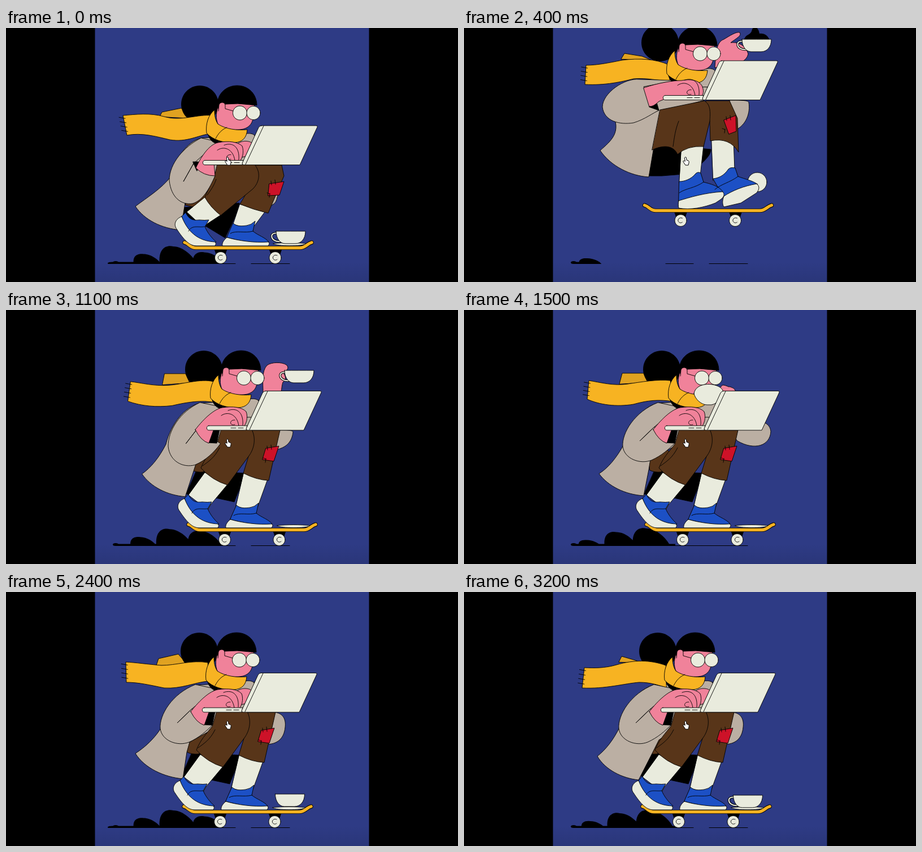
Animation of 800x450 px, one loop 3300 ms. Source, as an HTML page with a canvas:

```html
<!DOCTYPE html>
<html lang="en">
<head>
<meta charset="utf-8">
<title>Skating typist</title>
<style>
html, body { margin: 0; width: 100%; height: 100%; overflow: hidden; background: #000; }
canvas { display: block; }
</style>
</head>
<body>
<canvas id="stage" width="800" height="450"></canvas>
<script>
const ctx = document.getElementById('stage').getContext('2d');
const LOOP = 3300, STEP = 100, NUM = /-?\d+(\.\d+)?/g;
const CREAM = '#e9ebdd', SKIN = '#f0829a', YELLOW = '#f7b322', COAT = '#bbafa3',
  BROWN = '#583519', BLUE = '#1c50c5', RED = '#cd1228', BLACK = '#000';
let t = 0;

// Paths use absolute commands only, so their numbers alternate x, y.
const shift = (path, dx, dy = 0) => {
  let i = 0;
  return path.replace(NUM, n => (+n + (i++ % 2 ? dy : dx)).toFixed(1));
};
const mix = (a, b, k) => {
  const to = b.match(NUM);
  let i = 0;
  return a.replace(NUM, n => (+n + (to[i++] - n) * k).toFixed(2));
};
const circle = (x, y, r) => {
  const c = r * .552;
  return shift(`M${r} 0 C${r} ${c} ${c} ${r} 0 ${r} C${-c} ${r} ${-r} ${c} ${-r} 0 ` +
    `C${-r} ${-c} ${-c} ${-r} 0 ${-r} C${c} ${-r} ${r} ${-c} ${r} 0Z`, x, y);
};

// Standing, crouching and jumping shapes; the last two may be plain offsets.
function pose(stand, crouch, jump, extra) {
  const shape = p => typeof p === 'string' ? p : shift(stand, ...p);
  return { 0: shape(crouch), 400: shape(jump), 600: shift(stand, 7), 1500: shift(stand, 7),
    2000: shift(stand, 3), 2400: shift(stand, -1), 3200: stand, ...extra };
}
function at(keys) {
  const times = Object.keys(keys).map(Number);
  let i = times.length - 1;
  while (times[i] > t) i--;
  const from = times[i], to = times[i + 1] ?? LOOP;
  const k = (t - from) / (to - from);
  return mix(keys[from], keys[times[i + 1] ?? 0], from === 400 ? k * k : k * k * (3 - 2 * k));
}
function paint(path, fill, line = .9, color = BLACK) {
  const p = new Path2D(path);
  if (fill) { ctx.fillStyle = fill; ctx.fill(p); }
  if (line) { ctx.lineWidth = line; ctx.strokeStyle = color; ctx.stroke(p); }
}
const draw = (keys, fill, line, color) => paint(at(keys), fill, line, color);
const number = keys => +at(Object.fromEntries(Object.entries(keys).map(([k, v]) => [k, String(v)])));

const HEAD = [[0, 30], [4, -75]], LAP = [[0, 29.5], [4, -85.5]], BOARD = [[0, 0], [3.5, -66]];

const legs = [
  [CREAM, pose(circle(440, 375, 4), [0, 0], circle(519, 273, 17))],
  // far leg
  [CREAM, pose('M414 288 L456 300 L438 350 L420 353 L400 348Z', 'M414 312 L458 326 L440 350 L420 353 L402 348Z',
    'M438 196 L477 196 L479 252 L460 268 L441 270Z')],
  [BLUE, pose('M401 346 C408 352 416 351 425 350 Q433 349 440 342 L436 360 C446 368 458 371 464 379 L460 381 C440 381 410 377 390 371Z',
    [1, 0], 'M441 267 C450 266 460 262 468 250 Q472 246 480 248 L485 263 C498 268 510 270 520 277 L517 279 C495 280 475 288 460 300Z')],
  [CREAM, pose('M390 371 C384 376 381 381 382 386 L420 386 L463 386 Q467 381 463 379 C440 381 410 377 390 371Z',
    [1, 0], 'M460 298 C457 305 457 313 460 317 L490 310 L518 292 Q526 282 518 276 C495 280 475 288 460 298Z')],
  [BROWN, pose('M420 213 L470 213 L478 213 L458 302 Q436 301 413 289 L425 250Z',
    'M432 243 L488 243 L492 262 L464 328 Q438 322 414 312 L430 285Z',
    'M428 129 L470 129 L484 160 L486 220 Q470 193 436 200 L435 165Z')],
  [RED, pose('M453 245 L476 241 L467 268 L447 265Z', 'M466 276 L492 272 L484 296 L464 297Z',
    'M460 163 L481 155 L482 183 L469 188Z')],
  [null, pose('M455 241 L456 248 M462 239 L463 247 M448 262 L453 264 M452 270 L453 263', [14, 30], [9, -84])],
  // near leg
  [CREAM, pose('M345 288 L386 308 L355 345 L350 354 L316 328Z', 'M352 300 L382 330 L356 347 L350 354 L320 326Z',
    'M385 210 L424 208 L418 262 L400 275 L381 275Z')],
  [BLUE, pose('M316 327 C322 340 330 341 340 340 Q350 341 357 340 L350 352 C354 362 362 372 370 379 L368 381 C345 380 322 372 309 334Z',
    [2, 0], 'M381 272 C390 272 402 268 410 258 Q414 254 419 257 L424 273 C436 276 452 280 458 290 L456 293 C425 292 400 302 380 308Z')],
  [CREAM, pose('M309 334 C298 338 294 348 300 356 C312 374 322 386 335 386 L368 386 Q371 382 368 379 C345 378 322 368 309 334Z',
    [2, 0], 'M380 306 C379 310 379 316 380 319 C400 323 425 318 445 310 L454 304 Q464 297 458 290 C425 292 400 300 380 306Z')],
  [null, pose('M322 360 C328 348 340 354 350 352 M396 364 C406 358 422 364 436 360', [1, 0],
    'M381 292 C392 284 408 284 424 273 M444 286 C456 276 470 274 485 263')],
  [BROWN, pose('M374 212 L428 212 C436 228 432 245 424 257 L385 310 Q358 302 338 280 C345 262 355 252 366 238Z',
    'M374 242 L440 242 C452 256 448 274 437 285 L380 332 Q362 318 352 300 C358 285 364 275 370 258Z',
    'M347 145 L425 129 C437 135 436 150 435 165 L424 210 Q395 208 378 224 C370 206 350 208 333 216Z')],
  [null, pose('M341 276 C352 268 362 262 371 244', 'M356 296 C362 288 368 280 372 268', 'M370 210 C372 195 374 180 380 165')]
];
const lining = pose('M330 285 L413 289 C412 305 402 327 397 340 L360 332 L312 326Z',
  'M314 318 L413 310 C410 330 395 355 388 372 L355 352 L316 340Z',
  'M333 205 L437 215 C437 228 420 240 400 258 L350 262 L327 262Z');
const seat = pose('M320 266 L350 245 L366 260 L342 287 Q330 288 322 284Z', 'M318 310 L345 290 L360 290 L352 310 L335 318 L318 314Z',
  'M345 150 L360 150 L372 180 L370 210 L350 210 L335 215Z');
const coat = pose('M335 165 C310 172 285 200 276 238 C265 262 250 280 236 291 C250 315 280 330 309 333 L333 286 L345 262 L420 213 L440 160Z',
  'M345 195 C320 202 300 230 292 263 C275 285 250 300 229 316 C245 340 275 355 309 358 L317 310 L330 300 L420 242 L440 190Z',
  'M335 90 C310 92 270 110 262 150 C280 185 260 200 241 217 C260 245 295 262 327 264 L337 205 L347 150 L425 128 L435 90Z',
  { 1500: 'M342 165 C317 172 292 200 283 238 C270 262 255 280 239 290 C255 312 285 327 318 329 L327 283 L330 264 L427 213 L447 160Z',
    2400: 'M335 165 C310 172 285 200 276 238 C265 258 245 276 229 286 C245 312 280 328 313 331 L320 284 L325 266 L420 213 L440 160Z' });
const farShoulder = pose('M400 165 C420 156 440 154 441 164 L430 190 L400 190Z', ...LAP);
const sleeve = pose('M336 164 C295 180 272 218 274 242 C277 264 305 274 325 266 C343 258 356 246 366 236 L330 207 L304 232 L330 207 L372 172Z',
  'M345 195 C315 210 289 240 289 270 C292 300 310 314 330 311 C348 306 360 285 370 262 L332 240 L314 272 L332 240 L375 202Z',
  'M310 91 C285 88 245 115 245 140 C248 165 275 172 300 168 C320 162 335 150 345 146 L318 104 L324 110 L318 104 L375 93Z',
  { 800: 'M343 164 C312 180 291 212 291 242 C294 272 315 284 336 280 C356 272 372 256 384 237 L340 212 L323 240 L340 212 L382 172Z' });
const sleeveHole = pose('M350 235 L366 236 L371 212 L358 212Z', 'M331 237 L340 237 L346 242 L338 253Z', 'M328 140 L345 146 L341 132 L336 130Z');
const forearm = pose('M328 212 C345 190 362 176 375 173 C395 170 410 172 418 180 C422 190 418 205 412 207 L362 208 L352 236 Q338 232 328 212Z',
  'M336 248 C348 222 362 206 375 203 C395 199 410 202 418 209 C422 220 418 234 412 237 L368 238 L370 262 Q350 262 336 248Z',
  'M318 106 C345 97 370 93 385 93 C400 90 415 92 421 102 C425 110 424 118 420 121 L365 122 L345 130 Q335 140 328 139Z');
const fingers = pose('M374 187 C385 179 402 184 405 205 M386 178 C402 172 414 182 412 204 M398 203 C388 206 388 194 398 195', ...LAP);
const typing = pose('M404 180 C415 168 430 170 435 174 L424 198 L416 200 C422 186 410 180 404 184Z', ...LAP);
const cuff = {
  0: 'M470 243 C486 250 484 290 480 300 C478 310 474 313 465 316Z',
  400: 'M470 128 C490 128 504 128 504 132 C507 150 500 172 480 181Z',
  600: 'M470 213 C490 213 508 212 508 216 C506 235 495 246 470 249Z',
  1100: 'M470 213 C490 213 508 212 508 216 C506 235 495 246 470 249Z',
  1500: 'M470 213 C505 190 541 192 543 215 C542 240 515 250 484 232Z',
  2000: 'M470 225 C480 235 490 270 495 306 C490 315 475 320 455 322Z',
  2400: 'M470 213 C490 212 496 225 494 240 C492 260 480 270 460 270Z',
  3200: 'M470 213 C490 212 496 225 494 240 C492 260 480 270 460 270Z'
};
const raised = 'M444 70 C446 45 446 25 460 20 C470 14 482 6 488 8 C492 14 482 18 472 26 C490 24 500 35 503 46 C500 60 485 62 478 66Z';
const holding = 'M455 146 C455 130 452 108 462 98 C470 92 488 92 496 97 C502 102 498 108 490 110 C496 118 496 124 490 128 C488 134 488 140 487 146Z';
const farArm = { 0: shift(raised, -10, 140), 400: raised, 600: holding, 1100: holding,
  1500: 'M452 148 C452 140 454 135 458 133 C462 133 466 135 468 136 C470 136 472 136 473 137 C478 138 480 142 480 143 C480 145 480 147 480 148Z' };
const fist = 'M462 320 L495 311 C499 330 505 340 525 343 C540 350 541 368 528 374 L480 372 C468 350 465 335 462 320Z';
const reach = { 0: fist, 1700: shift(fist, 20, -150), 1800: shift(fist, 20, -100), 2000: fist, 2300: shift(fist, -30, -110) };

// The cup rides the board, is lifted, drunk from and put back.
function cupPath(path, mouth) {
  const go = (x, y) => shift(path, x, y);
  return { 0: path, 200: go(10, -215), 400: go(14, -340), 600: go(15, -253), 1100: go(15, -253),
    1300: mouth, 1600: mouth, 1800: go(20, -100), 2000: go(.5, 0), 2400: go(-1.5, -2), 3200: go(-1.5, 0) };
}
const cup = cupPath('M478 360 C478 374 486 382 494 382 L512 382 C522 382 530 374 530 360 C512 360 495 360 478 360Z',
  'M407 148 C409 158 420 168 430 168 L438 168 C450 166 459 152 458 142 C450 128 410 126 407 148Z');
const ear = 'M481 364 C465 360 467 380 486 378';
const handle = cupPath(ear, shift(ear, -60, -220));
const splash = {
  0: 'M480 361 C488 361 490 361 500 361 C510 361 515 361 518 361 C522 361 524 361 528 361Z',
  400: 'M496 20 C500 9 508 14 510 2 C514 -4 521 -2 523 10 C532 9 538 14 540 20Z',
  800: 'M502 107 C498 98 504 93 510 94 C520 95 522 98 526 101 C530 104 529 106 528 107Z',
  1100: 'M502 107 C502 107 504 107 510 107 C520 107 522 107 526 107 C530 107 529 107 528 107Z'
};

const flag = 'M368 128 C345 120 310 135 285 135 C260 135 240 130 220 128 L214 164 C240 172 265 173 290 171 C320 165 345 160 370 165Z';
const ripple = 'M357 128 C335 122 305 131 282 136 C255 138 235 130 217 128 L211 164 C235 170 260 172 285 168 C315 160 340 158 362 164Z';
const scarf = {
  0: 'M365 155 C340 152 310 166 280 157 C255 150 230 153 207 155 L214 190 C240 185 265 192 290 198 C320 203 340 190 362 187Z',
  400: 'M362 65 C340 55 310 53 280 57 C255 62 235 66 216 66 L214 100 C250 102 280 95 300 90 C325 88 340 93 364 94Z',
  600: shift(flag, 0, -4), 800: flag,
  1500: 'M365 125 C345 122 310 128 290 131 C265 135 240 128 221 125 L218 158 C240 168 270 172 300 167 C325 160 345 158 370 162Z',
  2000: ripple,
  2400: 'M357 125 C330 120 300 130 275 130 C250 128 230 125 212 124 L213 160 C235 160 255 165 280 170 C310 172 335 160 357 158Z',
  2800: shift(ripple, -3),
  3200: 'M357 130 C330 120 300 120 270 129 C250 135 230 135 213 134 L209 170 C250 172 285 162 310 160 C330 160 345 165 358 170Z'
};
const backTail = {
  0: 'M272 157 L276 149 L310 142 L328 160Z', 400: 'M278 55 L284 45 L315 50 L330 56Z',
  600: 'M279 134 L281 114 L318 114 L325 130Z', 1500: 'M275 131 L280 112 L318 112 L325 128Z',
  2000: 'M274 131 L275 112 L312 112 L320 128Z', 2400: 'M266 130 L270 118 L305 110 L322 130Z',
  3200: 'M274 124 L279 114 L300 120 L318 126Z'
};
const bun = pose(circle(343, 105, 33), [0, 30], [4, -79]);
const head = [
  [SKIN, pose('M377 104 C372 118 370 130 376 142 C390 152 410 151 420 149 C432 146 438 136 437 126 L440 104Z', ...HEAD)],
  [BLACK, pose('M374 106 C374 86 390 72 409 72 C430 72 444 88 444 107 L410 104 L388 105 L378 118Z', ...HEAD)],
  [SKIN, pose('M377 106 C379 100 388 101 388 107 L389 118 C386 124 378 124 376 117Z', ...HEAD), 0],
  [null, pose('M376 117 L377 106 C379 100 388 101 388 107 L388 113 L402 117', ...HEAD)],
  [CREAM, pose(circle(414, 120.5, 12.5), ...HEAD)],
  [CREAM, pose(circle(438, 120.5, 12), ...HEAD)]
];
const collarShade = pose('M356 150 C358 172 372 180 392 174 L380 160Z', ...HEAD);
const collar = pose('M369 115 C358 124 353 140 355 156 C365 168 385 174 405 173 C418 172 426 165 427 150 C410 152 388 149 375 140 C370 132 369 124 369 115Z', ...HEAD);
const collarFold = pose('M371 166 C376 156 382 150 391 146', ...HEAD);

const base = pose('M352 205 L420 205 L418 213 L352 213 C347 213 347 205 352 205Z', ...LAP);
const screen = pose('M452 143.5 L549 143.5 Q552 143.5 551 146 L520 213 L420 213 Q417 212 419 208 L447 147 Q449 143.5 452 143.5Z', ...LAP);
const edges = pose('M456 144 L424 212 M391 209 L400 209 M404 209 L413 209', ...LAP);

const deck = pose('M316 380 C324 382 326 389.5 336 389.5 L520 389.5 C530 389.5 533 382 541 380', ...BOARD);
const trucks = pose('M369 393 L391 393 L388 402 L372 402Z M466 393 L488 393 L485 402 L469 402Z', ...BOARD);
const wheels = pose(circle(380, 407, 10.5) + circle(476.5, 407, 10.5), ...BOARD);
const hubs = pose('M383 403 C377 400 373 407 377 410 C379 412 382 411 383 410 M480 403 C474 400 470 407 474 410 C476 412 479 411 480 410', ...BOARD);
const saucer = pose('M473 382 C478 387 526 387 531 382 C515 380 489 380 473 382Z', ...BOARD);

// Dust lumps swell behind the wheel and thin out to the left.
const drift = { 0: 0, 400: -80, 800: -120, 1500: -243, 2000: -304, 2400: -378, 3200: -507, 3299: -540 };
const reachRight = { 0: 380, 100: 370, 400: 246, 600: 215, 700: 380, 3200: 380 };
function dust() {
  const GAP = 54, limit = number(reachRight);
  const phase = ((t < 3200 ? number(drift) : -507) % GAP + GAP) % GAP;
  ctx.fillStyle = BLACK;
  for (let x = 140 + phase; x < 380; x += GAP) {
    const size = Math.max(0, Math.min((x - 185) / 115, 1, (390 - x) / 48));
    const cut = Math.max(0, Math.min(1, (limit - x) / 26));
    const h = 30 * size * cut, w = 12 + 18 * size;
    if (h < 1) continue;
    ctx.fill(new Path2D(`M${x - w} 418 C${x - w - 3} ${417 - h * .9} ${x - w * .6} ${417 - h * 1.1} ${x - w * .2} ${417 - h}` +
      ` C${x + w * .4} ${417 - h} ${x + w} ${417 - h * .4} ${x + w * 1.2} 418Z`));
  }
  ctx.fillRect(194, 414.5, Math.max(0, limit - 200), 3.5);
  ctx.beginPath();
  ctx.ellipse(194, 415.5, 5, 2.5, 0, 0, 7);
  ctx.fill();
  paint(`M357 417.5 L${t >= 1300 && t < 2200 ? 436 : 406} 417.5 M434 417.5 L502 417.5`, null, 1);
}

function drawScarf() {
  draw(backTail, '#e0a221');
  draw(bun, BLACK, 0);
  const path = at(scarf), n = path.match(NUM).map(Number);
  paint(path, YELLOW);
  for (let i = 0; i < 4; i++) {
    const k = .15 + i * .22, x = n[12] + (n[14] - n[12]) * k + 3, y = n[13] + (n[15] - n[13]) * k;
    paint(`M${x} ${y} L${x - 11} ${y - 2}`);
  }
}

function render() {
  ctx.fillStyle = BLACK;
  ctx.fillRect(0, 0, 800, 450);
  ctx.save();
  ctx.beginPath();
  ctx.rect(157.5, 0, 485, 450);
  ctx.clip();
  const sky = ctx.createLinearGradient(0, 415, 0, 450);
  sky.addColorStop(0, '#2e3b85');
  sky.addColorStop(1, '#2a3679');
  ctx.fillStyle = sky;
  ctx.fillRect(157, 0, 486, 450);
  ctx.lineCap = ctx.lineJoin = 'round';

  dust();
  draw(trucks, BLACK, 0);
  draw(wheels, CREAM);
  draw(hubs, null);
  draw(deck, null, 7.2);
  draw(deck, null, 5.4, YELLOW);
  if (t < 200 || t > 500) draw(saucer, CREAM);

  draw(lining, BLACK);
  if (t >= 1700 && t < 2300) draw(reach, SKIN);
  draw(cuff, COAT);
  draw(seat, BROWN);
  draw(coat, COAT);
  draw(farShoulder, COAT);
  legs.forEach(([fill, keys]) => draw(keys, fill));
  drawScarf();
  draw(sleeve, COAT);
  draw(sleeveHole, BLACK);
  draw(collarShade, BLACK);
  if (t >= 100 && t < 1700) draw(farArm, SKIN);
  head.forEach(([fill, keys, line]) => draw(keys, fill, line));
  draw(collar, YELLOW);
  draw(collarFold, null);

  if (t >= 100 && t < 1100) draw(splash, BLACK, 0);
  if (t < 1200 || t >= 2600) {
    draw(handle, null, 4);
    draw(handle, null, 2, CREAM);
  }
  draw(cup, CREAM);
  if (t < 200 || t >= 2200) draw(typing, SKIN);
  draw(forearm, SKIN);
  draw(fingers, null);
  draw(base, CREAM);
  draw(screen, CREAM);
  draw(edges, null);

  // mouse pointer
  paint('M390.5 230 Q392 227 393.5 230 L394 234 L397 235 Q399 236 398 239 L397 243 L392 243 L388 237 Q387 234 391 236Z', '#fff', 1);
  ctx.restore();
}

function tick(now) {
  t = Math.floor(now % LOOP / STEP) * STEP;
  render();
  requestAnimationFrame(tick);
}
requestAnimationFrame(tick);
</script>
</body>
</html>
```
